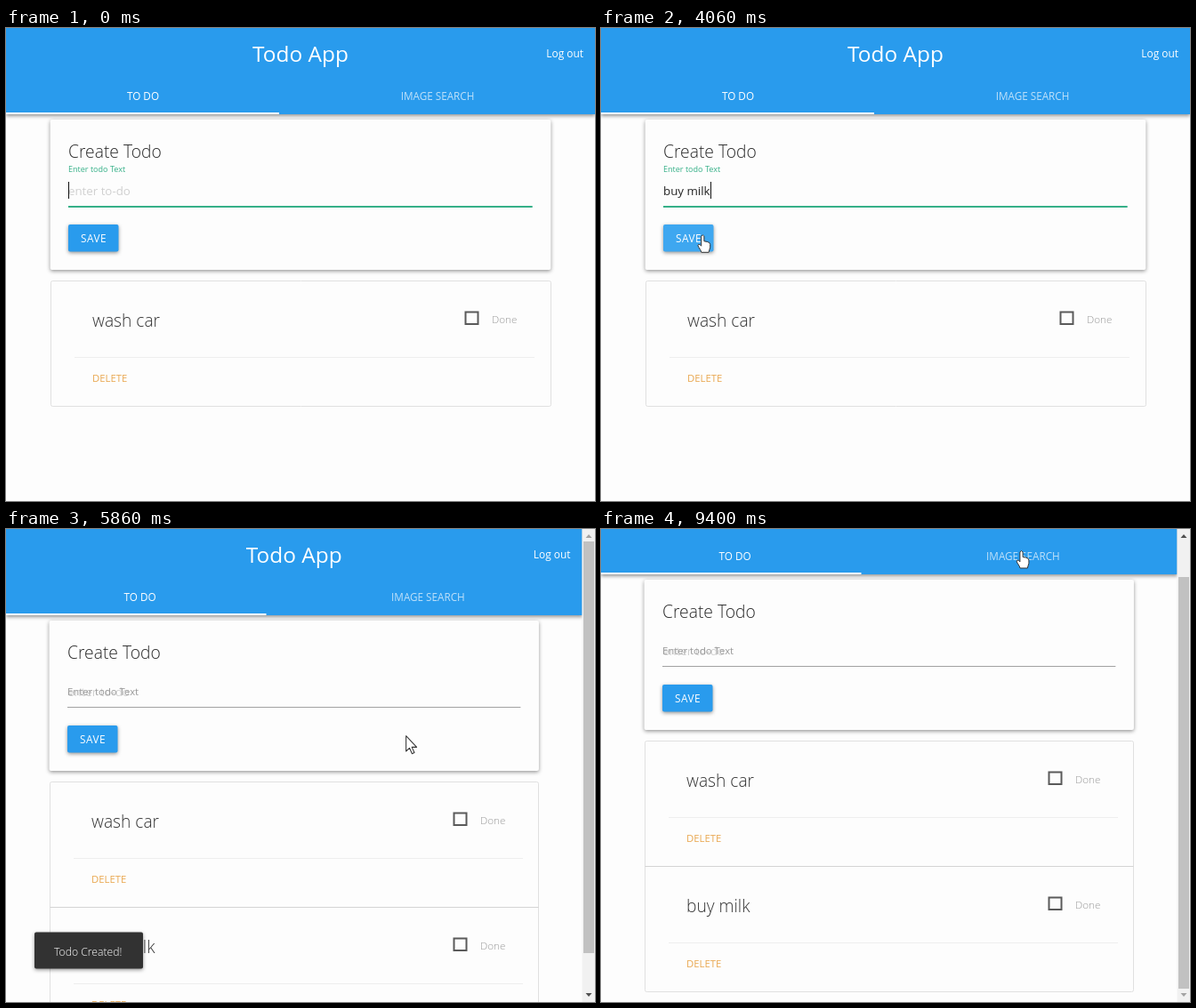
Write an HTML page with a canvas that moves like this. It is 662x532 px and loops after 9660 ms.

```html
<!DOCTYPE html>
<html lang="en">
<head>
<meta charset="utf-8">
<title>Todo App</title>
<style>
  html, body { margin: 0; width: 100%; height: 100%; overflow: hidden; background: #fdfdfd; }
  canvas { display: block; }
</style>
</head>
<body>
<canvas id="stage" width="662" height="532"></canvas>
<script>
const ctx = document.getElementById('stage').getContext('2d');
const STAGE_W = 662, STAGE_H = 532, LOOP = 9660, FPS = 15;
const BLUE = '#299bed', GREEN = '#36b088', ORANGE = '#e9a851';

const DRAFT = 'buy milk';
const KEY_TIMES = [1130, 1330, 1530, 1660, 1930, 2060, 2860, 3000];
const SAVED = 4200, CREATED = 4930, TOAST_END = 8930;
const MAX_SCROLL = 46;

// Pointer path: time, x, y
const PATH = [
  [330, 291, 181], [3730, 291, 181], [4130, 101, 236], [4260, 101, 236],
  [4730, 625, 42], [4930, 625, 42], [5260, 500, 190], [5470, 500, 190],
  [5730, 452, 222], [6200, 438, 272], [6330, 438, 272], [6600, 427, 300],
  [7070, 427, 300], [7730, 462, 4], [8000, 462, 4], [8200, 455, 5],
  [8530, 455, 5], [9400, 472, 24]
];

const clamp = v => Math.max(0, Math.min(1, v));
const progress = (t, from, to) => clamp((t - from) / (to - from));
const ease = p => p * p * (3 - 2 * p);
const easeOut = p => 1 - (1 - p) ** 3;
const mix = (a, b, p) => a + (b - a) * p;

function pointerAt(t) {
  if (t < PATH[0][0]) return null;
  const next = PATH.findIndex(k => k[0] > t);
  if (next < 0) return PATH[PATH.length - 1].slice(1);
  const [t0, x0, y0] = PATH[next - 1], [t1, x1, y1] = PATH[next];
  const p = ease(progress(t, t0, t1));
  return [mix(x0, x1, p), mix(y0, y1, p)];
}

function text(str, x, y, size, color, { weight = 400, align = 'left', spacing = 0 } = {}) {
  ctx.font = `${weight} ${size}px "Open Sans", "Noto Sans", sans-serif`;
  ctx.textAlign = align;
  ctx.letterSpacing = spacing + 'px';
  ctx.fillStyle = color;
  ctx.fillText(str, x, y);
}

function rect(x, y, w, h, color) {
  ctx.fillStyle = color;
  ctx.fillRect(x, y, w, h);
}

function panel(x, y, w, h, color, radius = 2) {
  ctx.save();
  ctx.shadowColor = 'rgba(0,0,0,.42)';
  ctx.shadowBlur = 4;
  ctx.shadowOffsetY = 1.5;
  ctx.fillStyle = color;
  ctx.beginPath();
  ctx.roundRect(x, y, w, h, radius);
  ctx.fill();
  ctx.restore();
}

function drawHeader(w, hoverLogout) {
  panel(0, -10, w, 107, BLUE, 0);
  if (hoverLogout) rect(w - 67, 0, 67, 55, 'rgba(0,0,0,.1)');
  text('Todo App', w / 2, 38, 24.4, '#fff', { align: 'center' });
  text('Log out', w - 13, 33, 11.9, '#fff', { align: 'right' });
  text('TO DO', w * .2326, 81, 11.7, '#fff', { align: 'center' });
  text('IMAGE SEARCH', w * .7326, 81, 11.7, 'rgba(255,255,255,.7)', { align: 'center' });
  rect(0, 95, w - 355, 2, '#fff');
}

function drawForm(w, t, hoverSave) {
  const left = w * .075, x = Math.round(left + 20.6), lineW = w * .85 - 41;
  panel(left, 103, w * .85, 169, '#fdfdfd');
  text('Create Todo', x, 146, 19.3, '#2c2c2c', { weight: 300 });

  const typed = t < SAVED ? DRAFT.slice(0, KEY_TIMES.filter(k => t >= k).length) : '';
  const blur = ease(progress(t, SAVED, SAVED + 300));
  if (!typed) text('enter to-do', x, 188, 13.3, '#d0d0d0');
  text('Enter todo Text', x, mix(162, 187, blur), mix(9.05, 11.3, blur), t < SAVED ? GREEN : '#999');
  if (typed) text(typed, x, 188, 13.3, '#222');
  if (t < SAVED) rect(x, 200, lineW, 2, GREEN);
  else rect(x, 200, lineW, 1, '#a2a2a2');

  if (t < SAVED && caretOn(t)) {
    ctx.font = '400 13.3px "Open Sans", "Noto Sans", sans-serif';
    ctx.letterSpacing = '0px';
    rect(x + Math.round(ctx.measureText(typed).width), 173, 1, 19, '#111');
  }

  panel(x, 221, 56.5, 30.5, hoverSave ? '#3ea7f0' : BLUE);
  text('SAVE', x + 14, 241, 11.8, '#fff', { spacing: .5 });
}

function caretOn(t) {
  if (t < KEY_TIMES[0]) return t < 330 || t >= 860;
  const last = KEY_TIMES.filter(k => t >= k).pop();
  return (t - last + 8) % 1060 < 530;
}

function drawTodo(w, y, title) {
  const left = Math.round(w * .075), right = Math.round(w * .925), x = left + 47;
  text(title, x, y + 52, 19.2, '#333', { weight: 300 });
  ctx.strokeStyle = '#5a5a5a';
  ctx.lineWidth = 2;
  ctx.strokeRect(right - 95.5, y + 35.5, 14, 13.5);
  text('Done', right - 66, y + 48, 11.7, '#999', { weight: 300 });
  rect(left + 27, y + 86, right - left - 45, 1, '#eee');
  text('DELETE', x, y + 114, 11.3, ORANGE);
}

function drawList(w, titles) {
  const left = Math.round(w * .075) + .5, width = Math.round(w * .85) - 1;
  ctx.strokeStyle = '#e0e0e0';
  ctx.lineWidth = 1;
  ctx.beginPath();
  ctx.roundRect(left, 284.5, width, 141 * titles.length, 2);
  ctx.stroke();
  titles.forEach((title, i) => {
    const y = 284 + 141 * i;
    if (i) rect(left, y, width, 1, '#d4d4d4');
    drawTodo(w, y, title);
  });
}

function drawToast(t) {
  const enter = easeOut(progress(t, CREATED, CREATED + 300));
  const leave = easeOut(progress(t, TOAST_END, TOAST_END + 375));
  ctx.save();
  ctx.globalAlpha = enter * (1 - leave);
  ctx.translate(0, 35 * (1 - enter) - 40 * leave);
  panel(32, 453.5, 122, 41, '#323232');
  text('Todo Created!', 54, 479.5, 12.2, '#fff', { weight: 300 });
  ctx.restore();
}

function drawScrollbar(scroll) {
  const p = scroll / MAX_SCROLL;
  rect(647.5, 0, 14.5, STAGE_H, '#f1f1f1');
  rect(649, 14 + 40 * p, 12, 463, '#c1c1c1');
  const arrow = (y, dir, active) => {
    ctx.fillStyle = active ? '#505050' : '#a3a3a3';
    ctx.beginPath();
    ctx.moveTo(651.5, y);
    ctx.lineTo(658.5, y);
    ctx.lineTo(655, y + 4 * dir);
    ctx.fill();
  };
  arrow(10, -1, p > 0);
  arrow(522, 1, p < 1);
}

const ARROW = new Path2D('M0 0V16L3.7 12.6L6.5 18.5L9 17.4L6.3 11.7H11.5Z');
const HAND = new Path2D('M-1.6 1.4Q0 -1.4 1.6 1.4V7L5 7.6Q8.4 8.3 8.4 10.5V14' +
  'L6.8 19.5H-1.4Q-2 17.2 -4.6 13.6Q-6 11.4 -4.6 10.6Q-3.2 10 -1.6 12.4Z');

function drawPointer([x, y], kind) {
  ctx.save();
  ctx.translate(x + .5, y + .5);
  ctx.lineWidth = 1;
  ctx.lineJoin = 'round';
  if (kind === 'dark') ctx.scale(.66, .7);
  else if (kind === 'arrow') ctx.scale(1.04, 1.08);
  const shape = kind === 'hand' ? HAND : ARROW;
  ctx.fillStyle = kind === 'dark' ? '#111' : '#fff';
  ctx.strokeStyle = kind === 'dark' ? '#111' : '#333';
  ctx.fill(shape);
  ctx.stroke(shape);
  ctx.restore();
}

function draw(now) {
  const t = Math.floor(((now % LOOP) + 7) * FPS / 1000) * 1000 / FPS;
  const created = t >= CREATED;
  const w = created ? 647.5 : STAGE_W;
  const scroll = MAX_SCROLL * ease(progress(t, 5870, 6200));
  const pointer = pointerAt(t);

  const over = (x, y, width, height) => {
    if (!pointer) return false;
    const px = pointer[0] - x, py = pointer[1] + scroll - y;
    return px >= 0 && px <= width && py >= 0 && py <= height;
  };
  const hoverLogout = over(w - 67, 0, 67, 55);
  const hoverSave = over(70, 221, 57, 31);
  const hoverTab = over(0, 55, w, 42);
  const hoverInput = over(70, 165, w * .85 - 41, 36);

  rect(0, 0, STAGE_W, STAGE_H, '#fdfdfd');
  ctx.save();
  ctx.translate(0, -scroll);
  drawHeader(w, hoverLogout);
  drawForm(w, t, hoverSave);
  drawList(w, created ? ['wash car', DRAFT] : ['wash car']);
  ctx.restore();

  if (created && t < TOAST_END + 375) drawToast(t);
  if (created) drawScrollbar(scroll);
  if (pointer) {
    const kind = hoverLogout || hoverSave || hoverTab ? 'hand' : hoverInput ? 'dark' : 'arrow';
    drawPointer(pointer, kind);
  }
}

const start = performance.now();
function loop() {
  draw(performance.now() - start);
  requestAnimationFrame(loop);
}
loop();
</script>
</body>
</html>
```
